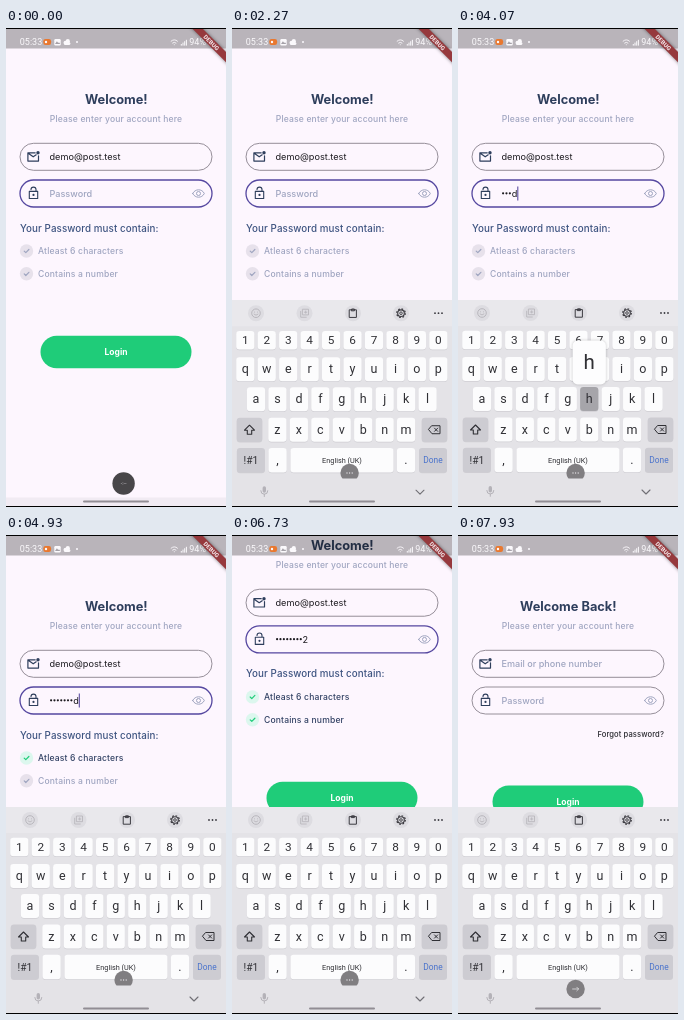
Animation of 220 by 479 pixels, one loop 8000 ms. Source, as an HTML page with a canvas:

```html
<!DOCTYPE html>
<html lang="en">
<head>
<meta charset="utf-8">
<title>Sign in</title>
<style>
html, body { margin: 0; width: 100%; height: 100%; overflow: hidden; background: #fdf6fe; }
canvas { display: block; width: 220px; height: 479px; }
</style>
</head>
<body>
<canvas id="stage"></canvas>
<script>
const W = 220, H = 479, LOOP = 8000;
const canvas = document.getElementById('stage');
const c = canvas.getContext('2d');
const scale = Math.max(1, window.devicePixelRatio || 1);
canvas.width = W * scale;
canvas.height = H * scale;

const INTER = 'Inter, sans-serif', ROBOTO = 'Roboto, sans-serif';
const PAGE = '#fdf6fe', NAVY = '#2e3e5c', BLUE = '#3e5481', MUTED = '#9fa5c0', GREEN = '#1fcc79';

// character, press time, release time
const TYPED = [
  ['h', 3330, 3470], ['d', 3530, 3600], ['h', 3670, 3800],
  ['d', 3870, 4000], ['h', 4030, 4130], ['d', 4200, 4270],
  ['h', 4330, 4400], ['d', 4430, 4530], ['2', 5670, 5790]
];
const T = { dock: 1530, keys: 1930, drag: 6600, press: 7600, next: 7800 };

const clamp = x => Math.min(1, Math.max(0, x));
const span = (t, start, len) => clamp((t - start) / len);
const easeOut = p => 1 - (1 - p) ** 3;
const mix = (a, b, p) => a + (b - a) * p;

function text(str, x, y, size, color, o = {}) {
  c.font = `${o.weight || 400} ${size}px ${o.font || INTER}`;
  c.letterSpacing = (o.gap || 0) + 'px';
  c.textAlign = o.align || 'left';
  c.textBaseline = 'alphabetic';
  c.fillStyle = color;
  c.fillText(str, x, y);
}

function box(x, y, w, h, r, fill, stroke, width = 1) {
  c.beginPath();
  c.roundRect(x, y, w, h, r);
  paint(fill, stroke, width);
}

function disc(x, y, r, fill, stroke, width = 1) {
  c.beginPath();
  c.arc(x, y, r, 0, Math.PI * 2);
  paint(fill, stroke, width);
}

function paint(fill, stroke, width) {
  if (fill) { c.fillStyle = fill; c.fill(); }
  if (stroke) { c.strokeStyle = stroke; c.lineWidth = width; c.stroke(); }
}

// Draws an SVG path centred on x, y.
function icon(d, x, y, color, width = 1.1, fill) {
  c.save();
  c.translate(x, y);
  c.lineCap = c.lineJoin = 'round';
  const p = new Path2D(d);
  if (fill) { c.fillStyle = color; c.fill(p); }
  else { c.strokeStyle = color; c.lineWidth = width; c.stroke(p); }
  c.restore();
}

function field(y, focused) {
  box(14, y - 13.5, 192, 27, 13.5, null, focused ? '#5547a0' : '#7c747f', focused ? 1.3 : 0.8);
}

function mail(y) {
  icon('M2-4H-5.3V4.3H5.3V-1M-5-3.5L0 0L3-2', 27.2, y, NAVY, 1.2);
  disc(32, y - 4, 1.7, NAVY);
}

function lock(y) {
  icon('M-4.2-1.8H4.2V5.3H-4.2ZM2.5-2V-3.6A2.5 2.5 0 0 0-2.5-3.6', 27.5, y - 0.3, NAVY, 1.1);
  disc(27.5, y + 1.4, 1.1, NAVY);
}

function eye(y) {
  icon('M-5.8 0C-3.5-5 3.5-5 5.8 0C3.5 5-3.5 5-5.8 0Z', 192.5, y, MUTED, 1);
  disc(192.5, y, 2, null, MUTED, 1);
}

function check(y, label, p) {
  const tone = (a, b) => `rgb(${a.map((v, i) => Math.round(mix(v, b[i], p))).join()})`;
  disc(20.5, y, 6.7, tone([231, 225, 235], [220, 247, 238]));
  icon('M-2.3 .1L-.7 1.7L2.4-1.5', 20.5, y, tone([159, 165, 192], [31, 204, 121]), 1.2);
  text(label, 32, y + 3, 8.56, tone([159, 165, 192], [50, 66, 100]), { weight: 500, gap: 0.17 });
}

function button(y, pressed) {
  box(34.5, y - 16.2, 151, 32.4, 16.2, pressed ? '#1bbd6f' : GREEN);
  text('Login', 110, y + 3, 8.5, '#fff', { weight: 700, align: 'center' });
}

function heading(title) {
  text(title, 110.3, 76.3, 12.8, NAVY, { weight: 700, align: 'center' });
  text('Please enter your account here', 110, 94.2, 8.56, MUTED, { weight: 500, gap: 0.17, align: 'center' });
}

const hint = (str, y) => text(str, 43.5, y + 3.3, 9.1, MUTED, { weight: 500 });

function caretOn(t, last) {
  if (last) return Math.floor((t - last[2]) / 480) % 2 === 0;
  return t >= 530 && Math.floor((t - 530) / 510) % 2 === 0;
}

function password(t, y) {
  const done = TYPED.filter(k => t >= k[2]);
  const last = done[done.length - 1];
  let x = 43.5;
  if (!last) hint('Password', y);
  else {
    const shown = t < last[2] + 1500;
    const dots = done.length - (shown ? 1 : 0);
    for (let i = 0; i < dots; i++) disc(x + 1.6 + i * 3.38, y - 0.2, 1.1, '#1d1b20');
    x += dots * 3.38;
    if (shown) {
      text(last[0], x, y + 3.2, 9.17, '#1d1b20');
      x += c.measureText(last[0]).width;
    }
  }
  if (caretOn(t, last)) {
    c.fillStyle = '#5d4fa3';
    c.fillRect(x, y - 7, 1.1, 14);
  }
}

function signUp(t) {
  const scroll = t < T.drag ? 0 : 68 * easeOut(span(t, T.drag - 30, 302));
  c.save();
  c.translate(0, -scroll);
  heading('Welcome!');
  field(128.8);
  mail(128.8);
  text('demo@post.test', 43.5, 132, 9.17, '#1d1b20');
  field(165.5, true);
  lock(165.5);
  password(t, 165.5);
  eye(165.5);
  text('Your Password must contain:', 14, 203.5, 9.78, BLUE, { weight: 500, gap: 0.1 });
  check(223, 'Atleast 6 characters', span(t, TYPED[5][2], 200));
  check(245.8, 'Contains a number', span(t, TYPED[8][2], 120));
  button(324, t >= T.press);
  c.restore();
}

function signIn() {
  c.fillStyle = PAGE;
  c.fillRect(0, 0, W, H);
  heading('Welcome Back!');
  field(128.8);
  mail(128.8);
  hint('Email or phone number', 128.8);
  field(165.5);
  lock(165.5);
  hint('Password', 165.5);
  eye(165.5);
  text('Forgot password?', 206, 201.5, 7.6, '#2a2a30', { weight: 500, gap: 0.1, align: 'right' });
  button(266.8);
}

const ROWS = [
  ['1234567890', 13.3, 312, 18.5],
  ['qwertyuiop', 13.3, 341, 24],
  ['asdfghjkl', 24, 371, 24],
  ['zxcvbnm', 45.4, 401.5, 24]
];
const PITCH = 21.45, INK = '#303035';

function key(x, y, w, h, label, fill = '#fcfcfd', o = {}) {
  box(x - w / 2, y - h / 2 + 0.7, w, h, 3.2, '#cfced3');
  box(x - w / 2, y - h / 2, w, h, 3.2, fill);
  if (label) text(label, x, y + (o.drop || 4.2), o.size || 12.5, o.color || INK, { font: ROBOTO, align: 'center' });
}

function gear(x, y, color) {
  disc(x, y, 3.3, null, color, 1.1);
  c.setLineDash([1.7, 4.3 * Math.PI * 2 / 8 - 1.7]);
  disc(x, y, 4.3, null, color, 1.2);
  c.setLineDash([]);
  disc(x, y, 1.3, null, color, 0.9);
}

function toolbar() {
  c.fillStyle = '#e9e8ec';
  c.fillRect(0, 272, W, 26);
  [24, 72.5, 121, 169].forEach(x => disc(x, 285, 8, '#dddce1'));
  const faint = '#b9b7bd', dark = '#3b3a40';
  disc(24, 285, 4.3, null, faint, 1);
  icon('M-2 1Q0 3.2 2 1M-1.5-1.2V-1.1M1.5-1.2V-1.1', 24, 285, faint, 0.9);
  icon('M-1.7-4H4V1.7H-1.7ZM-3.8-1.8V4H1.8M0-1H2.3M1.2-2.2V0', 72.5, 285, faint, 0.9);
  icon('M-3.4-3.4H3.4V4.2H-3.4ZM-1.4-3.4V-4.2H1.4V-2.4H-1.4Z', 121, 285, dark, 1);
  gear(169, 285, dark);
  [-3.5, 0, 3.5].forEach(d => disc(206.5 + d, 285, 0.9, dark));
}

function keyboard(t, shift) {
  const hit = TYPED.find(k => t >= k[1] && t < k[2]);
  let bubble;
  c.save();
  c.translate(0, shift);
  c.fillStyle = '#e4e3e7';
  c.fillRect(0, 272, W, 207);
  toolbar();
  for (const [chars, x0, y, h] of ROWS) {
    [...chars].forEach((ch, i) => {
      const x = x0 + i * PITCH, on = hit && hit[0] === ch;
      if (on) bubble = [ch, x, y];
      key(x, y, 18.2, h, ch, on ? '#a6a5aa' : undefined, { size: h < 20 ? 11.8 : 12.5 });
    });
  }
  const grey = '#cdccd2';
  key(17.5, 401.5, 25.5, 24, '', grey);
  icon('M0-5L5 0H2.2V4H-2.2V0H-5Z', 17.5, 402, INK, 1.1);
  key(202.5, 401.5, 25.5, 24, '', grey);
  icon('M-2.5-4H5.5V4H-2.5L-5.8 0ZM0-1.6L3.2 1.6M3.2-1.6L0 1.6', 202.5, 401.5, INK, 1);
  key(18.9, 432, 28, 24.5, '!#1', grey, { size: 10.3, drop: 3.7 });
  key(45.6, 432, 18.2, 24.5, ',');
  key(110, 432, 103, 24.5, 'English (UK)', undefined, { size: 7.3, drop: 2.6 });
  key(174, 432, 18.2, 24.5, '.');
  key(201, 432, 28, 24.5, 'Done', grey, { size: 8.4, color: '#4a73cc', drop: 3 });
  box(30.6, 458, 3.4, 6.5, 1.7, '#b4b2b8');
  icon('M-3.5-.5A3.5 3.5 0 0 0 3.5-.5M0 3V5.3', 32.3, 463, '#b4b2b8', 1);
  if (t < T.next + 100) icon('M-4-2L0 2L4-2', 188, 464, '#706f75', 1.1);
  if (bubble) {
    const [ch, x, y] = bubble;
    c.save();
    c.shadowColor = 'rgba(0,0,0,.22)';
    c.shadowBlur = 3 * scale;
    box(x - 16.6, y - 58.5, 33.2, 44, 5, '#fdfdfe');
    c.restore();
    text(ch, x, y - 30, 20.5, INK, { font: ROBOTO, align: 'center' });
  }
  c.restore();
}

function recorder(t, up) {
  const p = easeOut(span(t, T.dock, 260));
  const moved = t >= T.next + 60;
  const y = moved ? 454 : mix(mix(455.5, 461, p), 445, up);
  const shade = Math.round(mix(mix(72, 154, p), 128, up));
  c.save();
  c.beginPath();
  c.rect(0, 0, W, moved ? H : mix(470.5, 450.5, up));
  c.clip();
  disc(117.6, y, mix(11.2, 9.2, p), `rgb(${shade},${shade - 2},${shade + 1})`);
  if (p < 0.5) text('-:--', 117.6, y + 1.8, 5.5, '#d5d2d7', { font: ROBOTO, align: 'center' });
  else if (moved) icon('M-3 0H3M1.2-1.8L3 0L1.2 1.8', 117.6, y, '#dedde0', 0.8);
  else [-2.6, 0, 2.6].forEach(d => disc(117.6 + d, y, 0.65, '#e4e2e6'));
  c.restore();
}

function statusBar() {
  c.fillStyle = 'rgba(0,0,0,.27)';
  c.fillRect(0, 0, W, 20.5);
  const ink = '#fbf9fc';
  text('05:33', 13.8, 17.2, 9, ink, { font: ROBOTO });
  box(37.3, 11, 7.8, 6, 2.2, '#e9782f');
  disc(40, 14, 1.2, ink);
  box(48.3, 11, 6.4, 6.4, 1.2, ink);
  icon('M-2.5 2L-.6-.7L.8 1L1.5 .2L2.7 2Z', 51.5, 14, '#a5a1a8', 1, true);
  disc(59.5, 14.8, 2, ink);
  disc(61.8, 13.2, 2.1, ink);
  box(58, 14, 6.4, 3, 1.5, ink);
  disc(71, 14, 1, ink);
  icon('M-3.2-1.3Q0-4.2 3.2-1.3M-1.7 .5Q0-1 1.7 .5M0 2.2V2.3', 168.3, 14.5, ink, 0.9);
  [0, 1, 2, 3].forEach(i => {
    c.fillStyle = ink;
    c.fillRect(174.8 + i * 1.7, 16 - i * 1.4, 1, 1.6 + i * 1.4);
  });
  text('94%', 183.3, 17.2, 9, ink, { font: ROBOTO });
  box(202.5, 10.5, 4, 7, 1.2, ink);
}

function ribbon() {
  c.save();
  c.translate(W, 0);
  c.rotate(Math.PI / 4);
  c.shadowColor = 'rgba(0,0,0,.5)';
  c.shadowBlur = 3.5 * scale;
  c.fillStyle = '#96393d';
  c.fillRect(-34, 17, 68, 7.2);
  c.shadowBlur = 0;
  text('DEBUG', 0, 22.8, 6, '#eedde0', { weight: 800, font: ROBOTO, align: 'center' });
  c.restore();
}

function draw(t) {
  c.setTransform(scale, 0, 0, scale, 0, 0);
  c.fillStyle = PAGE;
  c.fillRect(0, 0, W, H);
  signUp(t);
  if (t >= T.next) {
    c.globalAlpha = span(t, T.next - 40, 160);
    signIn();
    c.globalAlpha = 1;
  }
  statusBar();
  ribbon();
  c.fillStyle = '#f1ebf3';
  c.fillRect(0, 469.5, W, 9.5);
  const up = easeOut(span(t, T.keys, 380));
  if (up > 0) keyboard(t, 207 * (1 - up));
  recorder(t, up);
  box(77, 472.6, 66, 2, 1, '#918d94');
  c.fillStyle = '#000';
  c.fillRect(0, 0, W, 1);
  c.fillRect(0, 478, W, 1);
}

function tick(now) {
  draw(now % LOOP);
  requestAnimationFrame(tick);
}
draw(0);
requestAnimationFrame(tick);
</script>
</body>
</html>
```
